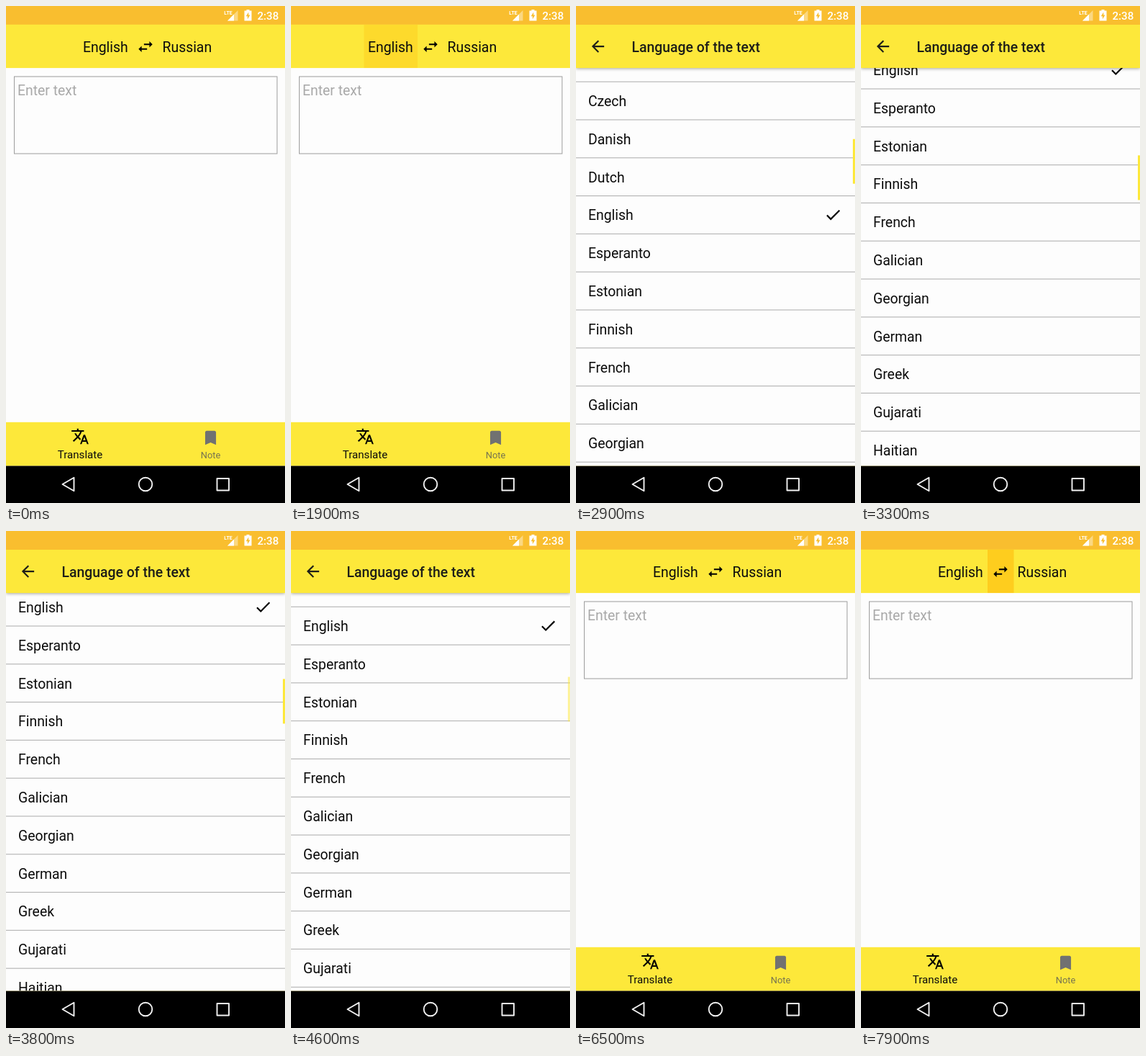
These frames come from a looping animation (388 px wide and 690 px high, 8 s). An HTML page:

```html
<!DOCTYPE html>
<html lang="en">
<head>
<meta charset="utf-8">
<title>Translator</title>
<style>
  html, body { margin: 0; width: 100%; height: 100%; overflow: hidden; background: #000; }
  svg { display: block; width: 388px; height: 690px; }
  text { font: 19.4px Roboto, sans-serif; fill: #0c0c0c; }
  .title { font-weight: 500; fill: #1e1e18; }
  .hint { fill: #a9a9a9; }
  .tab { font-size: 15.1px; text-anchor: middle; }
  .tab.off { font-size: 12.9px; fill: #77744f; }
  .clock { font-size: 15.1px; font-weight: 500; fill: #fff; }
  .lte { font-size: 7px; font-weight: 700; fill: #fff; }
  .status { fill: #f9be2f; }
  .bar { fill: #fde83a; }
  .page { fill: #fdfdfd; }
  .press { fill: #fecd1e; }
  .nav { fill: none; stroke: #f2f2f2; stroke-width: 1.9; stroke-linejoin: round; }
  #list .bar { filter: drop-shadow(0 1px 2px rgba(0, 0, 0, .35)); }
</style>
</head>
<body>
<svg viewBox="0 0 388 690" xmlns="http://www.w3.org/2000/svg">
  <defs>
    <clipPath id="view"><rect y="86" width="388" height="552.3"/></clipPath>
    <path id="check" d="M9 16.17L4.83 12l-1.42 1.41L9 19 21 7l-1.41-1.41z"/>
  </defs>

  <g id="main">
    <rect width="388" height="690"/>
    <rect class="page" width="388" height="638.3"/>
    <rect class="status" width="388" height="26"/>
    <rect class="bar" y="25.8" width="388" height="60.3"/>
    <rect class="press" id="pressFrom" x="101.5" y="26" width="74.5" height="60"/>
    <rect class="press" id="pressSwap" x="176" y="26" width="36.5" height="60"/>
    <text x="107" y="64">English</text>
    <text x="217.5" y="64">Russian</text>
    <path transform="translate(181.1 43.6) scale(1.077)" d="M6.99 11L3 15l3.99 4v-3H14v-2H6.99v-3zM21 9l-3.99-4v3H10v2h7.01v3L21 9z"/>
    <rect x="11.5" y="98" width="365.5" height="107" fill="none" stroke="#9c9c9c"/>
    <text class="hint" x="16" y="124">Enter text</text>
    <rect class="bar" y="577.8" width="388" height="60.5"/>
    <path transform="translate(90.1 584.6) scale(1.077)" d="M12.87 15.07l-2.54-2.51.03-.03c1.74-1.94 2.98-4.17 3.71-6.53H17V4h-7V2H8v2H1v1.99h11.17C11.5 7.92 10.44 9.75 9 11.35 8.07 10.32 7.3 9.19 6.69 8h-2c.73 1.63 1.73 3.17 2.98 4.56l-5.09 5.02L4 19l5-5 3.11 3.11.76-2.04zM18.5 10h-2L12 22h2l1.12-3h4.75L21 22h2l-4.5-12zm-2.62 7l1.62-4.33L19.12 17h-3.24z"/>
    <text class="tab" x="103" y="627.5">Translate</text>
    <path fill="#717171" transform="translate(271.6 586.6) scale(1.077)" d="M17 3H7c-1.1 0-1.99.9-1.99 2L5 21l7-3 7 3V5c0-1.1-.9-2-2-2z"/>
    <text class="tab off" x="284.5" y="627.5">Note</text>
  </g>

  <rect id="dim" width="388" height="690" opacity="0"/>

  <g id="list" opacity="0">
    <rect class="page" width="388" height="638.3"/>
    <g clip-path="url(#view)">
      <g id="rows"></g>
      <rect class="bar" id="thumb" x="385" y="86" width="3" height="62" style="filter:none"/>
    </g>
    <rect class="bar" y="25.8" width="388" height="60.3"/>
    <rect class="status" width="388" height="26"/>
    <path fill="#1e1e18" transform="translate(17.6 43.2) scale(1.077)" d="M20 11H7.83l5.59-5.59L12 4l-8 8 8 8 1.41-1.41L7.83 13H20v-2z"/>
    <text class="title" x="77.5" y="63.5">Language of the text</text>
  </g>

  <g id="system">
    <text class="lte" x="303.3" y="11.5" textLength="auto">LTE</text>
    <path fill="#fff" opacity=".4" d="M322.5 6v14.5H308z"/>
    <path fill="#fff" d="M317 11.5v9h-9z"/>
    <path fill="#fff" fill-rule="evenodd" d="M334.5 5h4v1.6h3v13.9h-10V6.600h3zM337.300 8.600l-3.600 5.700h2.200v4l3.600-5.700h-2.200z"/>
    <text class="clock" x="349.500" y="18.800">2:38</text>
    <g class="nav">
      <path d="M78.500 664l16-9.300v18.600z"/>
      <circle cx="194" cy="664" r="9.300"/>
      <rect x="293.500" y="656" width="16.500" height="16.500"/>
    </g>
  </g>
</svg>

<script>
const LOOP = 8000, TICK = 100;
const ROW = 52.8, TOP = 86, VIEW = 552.3, ROW_COUNT = 93;
const SLIDE = 55.2;
const languages = `Afrikaans Albanian Amharic Arabic Armenian Azerbaijani Bashkir Basque
  Belarusian Bengali Bosnian Bulgarian Burmese Catalan Cebuano Chinese Croatian Czech
  Danish Dutch English Esperanto Estonian Finnish French Galician Georgian German
  Greek Gujarati Haitian Hebrew Hindi`.split(/\s+/);

const $ = id => document.getElementById(id);
const clamp = u => Math.min(1, Math.max(0, u));
const span = (t, from, to) => clamp((t - from) / (to - from));
const smooth = u => u * u * (3 - 2 * u);
const set = (id, name, value) => $(id).setAttribute(name, value);

$('rows').innerHTML = languages.map((name, i) => {
  const y = TOP + i * ROW;
  const mark = name === 'English'
    ? `<use href="#check" transform="translate(344.600 ${y + 12.600}) scale(1.077)"/>` : '';
  return `<text x="17" y="${y + 33}">${name}</text>${mark}
    <rect y="${y + 51.500}" width="388" height="1.100" fill="#b2b2b2"/>`;
}).join('');

// Fling down, then a slow drag back
function scrollAt(t) {
  const fling = 1 - (1 - span(t, 2600, 3300)) ** 3;
  return 1079 * fling - 43 * smooth(span(t, 3500, 4200));
}

// The list window rises while fading in, and drops while fading out
function windowAt(t) {
  if (t < 4985) {
    return {
      y: SLIDE * (1 - span(t, 2162, 2512)) ** 5,
      alpha: span(t, 2162, 2297)
    };
  }
  return {
    y: SLIDE * span(t, 4985, 5235) ** 2,
    alpha: 1 - span(t, 5085, 5217)
  };
}

function draw(t) {
  const { y, alpha } = windowAt(t);
  const scroll = scrollAt(t);
  set('list', 'transform', `translate(0 ${y.toFixed(2)})`);
  set('list', 'opacity', alpha);
  set('dim', 'opacity', t < 4985 ? 0.1 * alpha : 0);
  set('rows', 'transform', `translate(0 ${-scroll.toFixed(2)})`);
  set('thumb', 'y', TOP + scroll * VIEW / (ROW * ROW_COUNT));
  set('thumb', 'opacity', 1 - span(t, 4500, 4700));
  set('pressFrom', 'opacity', t < 2300 ? span(t, 1800, 2000) : 0);
  set('pressSwap', 'opacity', span(t, 7700, 7900));
}

// The screen refreshes ten times a second
const start = performance.now();
function frame() {
  const t = (performance.now() - start) % LOOP;
  draw(Math.floor(t / TICK) * TICK);
  requestAnimationFrame(frame);
}
frame();
</script>
</body>
</html>
```
